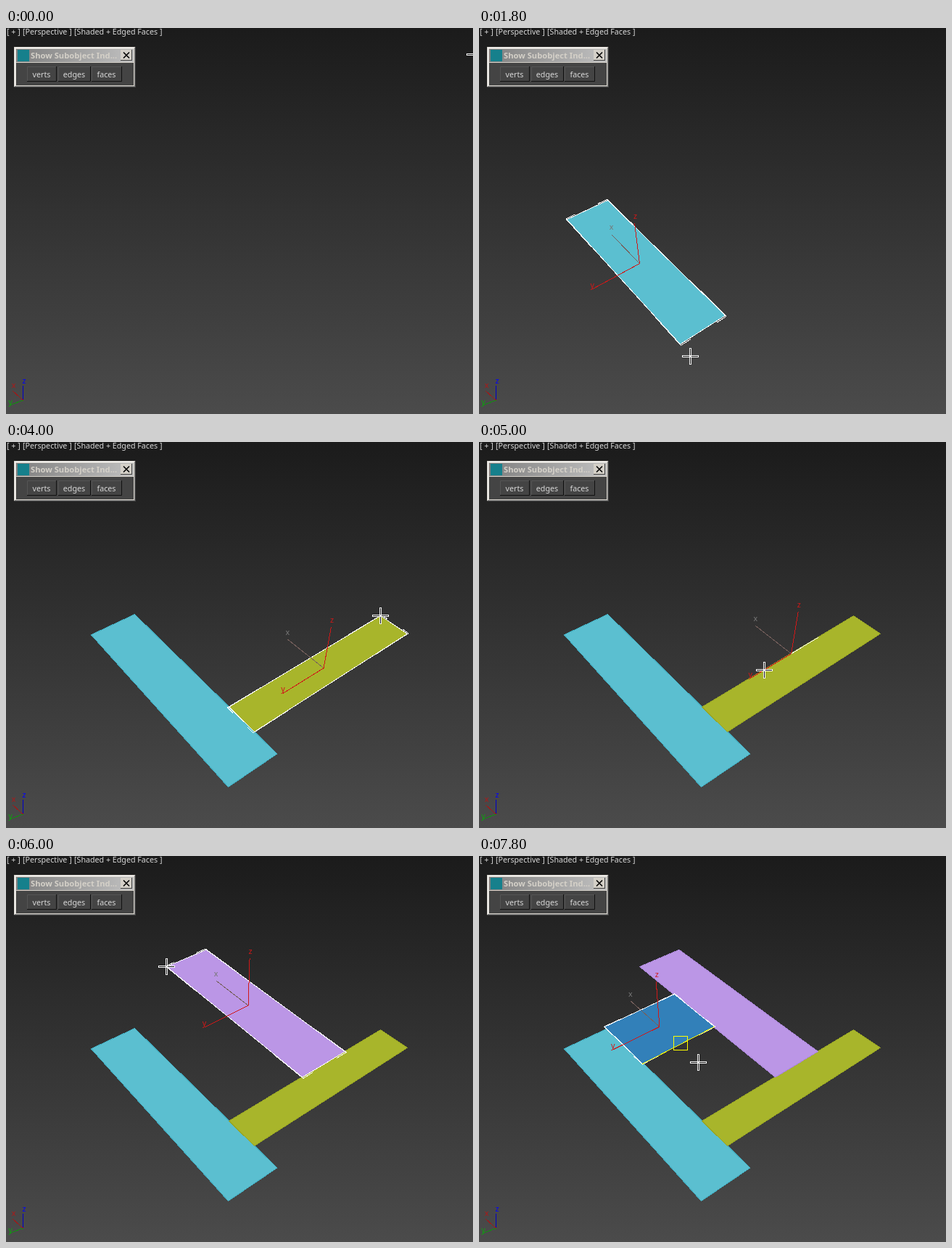
Animation of 644x532 px, one loop 8000 ms. Source, as an HTML page:

```html
<!DOCTYPE html>
<html lang="en">
<head>
<meta charset="utf-8">
<title>Building planes in a viewport</title>
<style>
  html, body { margin: 0; width: 100%; height: 100%; overflow: hidden; background: #333; }
  svg { display: block; width: 644px; height: 532px; }
  text { font: 10.7px "Noto Sans", "Open Sans", sans-serif; fill: #d8d8d8; white-space: pre; }
  .title { font-weight: bold; font-size: 11.2px; fill: #d4d0c8; }
  .mid { text-anchor: middle; }
</style>
</head>
<body>
<svg viewBox="0 0 644 532">
  <defs>
    <linearGradient id="sky" x2="0" y2="1">
      <stop stop-color="#1b1b1b"/><stop offset="1" stop-color="#4b4b4b"/>
    </linearGradient>
    <linearGradient id="bar">
      <stop stop-color="#808080"/><stop offset="1" stop-color="#c0c0c0"/>
    </linearGradient>
  </defs>
  <rect width="644" height="532" fill="url(#sky)"/>
  <text x="1" y="9">[ + ]</text>
  <text x="23" y="9">[Perspective ]</text>
  <text x="94" y="9">[Shaded + Edged Faces ]</text>

  <g shape-rendering="crispEdges">
    <rect x="11" y="26" width="168" height="56" fill="#404040"/>
    <rect x="11" y="26" width="167" height="55" fill="#d4d0c8"/>
    <rect x="12" y="27" width="166" height="54" fill="#808080"/>
    <rect x="12" y="27" width="165" height="53" fill="#fff"/>
    <rect x="13" y="28" width="164" height="52" fill="#d4d0c8"/>
    <rect x="14" y="29" width="162" height="18" fill="url(#bar)"/>
    <rect x="14" y="48" width="162" height="31" fill="#444"/>
    <rect x="16" y="30" width="16" height="16" fill="#16808c"/>
    <rect x="158" y="30" width="16" height="15" fill="#404040"/>
    <rect x="158" y="30" width="15" height="14" fill="#d4d0c8"/>
  </g>
  <path d="M162 33.5l8 8m0-8l-8 8" stroke="#000" stroke-width="1.6"/>
  <text class="title" x="34" y="42">Show Subobject Ind...</text>
  <g id="buttons"></g>
  <g id="tripod"></g>
  <g id="scene" transform="translate(.5 .5)"></g>
  <g id="cursor" shape-rendering="crispEdges"></g>
</svg>
<script>
const STEP = 200, LOOP = 8000;
const $ = id => document.getElementById(id);

// Vanishing points of the three axes
const VX = [-555, -480], VY = [1740, -497], VZ = [308, 1018];

// Each plane is dragged from corner to corner; bend bows the path, lead lets the cursor run ahead
const planes = [
  { fill: '#5bbfd0', edge: '#43adc0', start: 3, end: 10.2,
    from: [177, 237], to: [306, 475], bend: [-322, 0], lead: .07 },
  { fill: '#a8b52b', edge: '#98a524', start: 15, end: 20,
    from: [342, 399], to: [516, 239], bend: [0, 0], lead: 0 },
  { fill: '#bb96e6', edge: '#a985d6', start: 24, end: 30,
    from: [467, 269], to: [221, 152], bend: [-285, 553], lead: 0 },
  { fill: '#3280b9', edge: '#2a70a4', start: 34, end: 37,
    from: [269, 190], to: [225, 286], bend: [0, 0], lead: 0 }
];

// Plane side lit while the cursor snaps to it
const snaps = [
  { plane: 0, side: 0, part: [.14, .84], from: 13, to: 15, at: [340, 399] },
  { plane: 1, side: 1, part: [0, 1], from: 23, to: 23, at: [468, 268] },
  { plane: 3, side: 1, part: [0, 1], from: 39, to: 39, at: [278, 258] }
];

const clamp = k => Math.min(1, Math.max(0, k));
const ease = k => k * k * (3 - 2 * k);
const mix = (a, b, k) => a.map((v, i) => v + (b[i] - v) * k);

function meet(a, b, c, d) {
  const ux = b[0] - a[0], uy = b[1] - a[1], vx = d[0] - c[0], vy = d[1] - c[1];
  const k = ((c[0] - a[0]) * vy - (c[1] - a[1]) * vx) / (ux * vy - uy * vx);
  return [a[0] + ux * k, a[1] + uy * k];
}

const quad = (p, q) => [p, meet(p, VX, q, VY), q, meet(p, VY, q, VX)];

function dragged(p, s, lead = 0) {
  const k = clamp((s - p.start) / (p.end - p.start) + lead);
  const bow = k * (1 - k) ** 2;
  return mix(p.from, p.to, k).map((v, i) => v + p.bend[i] * bow);
}

function area([a, b, c, d]) {
  return Math.abs((c[0] - a[0]) * (d[1] - b[1]) - (c[1] - a[1]) * (d[0] - b[0])) / 2;
}

// Rides along with a drag, otherwise glides to the next one
function cursorAt(s) {
  let last = { step: 0, at: [646, 36] };
  for (const p of planes) {
    if (s < p.start) return glide(last, p.start, p.from, s);
    if (s <= p.end) return dragged(p, s, p.lead);
    last = { step: p.end, at: p.to };
  }
  return glide(last, 39, [302, 284], s);
}

const glide = (last, step, at, s) => mix(last.at, at, ease(clamp((s - last.step) / (step - last.step))));

const line = (a, b, color) =>
  `<path d="M${a}L${b}" stroke="${color}" fill="none" shape-rendering="crispEdges"/>`;

const label = ([x, y], t, color) =>
  `<text class="mid" x="${x}" y="${y}" style="fill:${color}">${t}</text>`;

const polygon = (q, fill, stroke) =>
  `<polygon points="${q.join(' ')}" fill="${fill}" stroke="${stroke}" shape-rendering="crispEdges"/>`;

function brackets(q, center) {
  const big = q.map(p => mix(center, p, 1.015));
  return big.map((p, i) => [1, 3].map(n =>
    line(p, mix(p, big[(i + n) % 4], .22), '#fff')).join('')).join('');
}

function gizmo(c) {
  const red = '#d01818';
  const x = mix(c, VX, .05), y = mix(c, VY, -.043), z = mix(c, VZ, -.08);
  return line(c, x, '#76605c') + line(c, y, red) + line(c, z, red) +
    label([x[0], x[1] - 6], 'x', '#777') + label([y[0], y[1] - 2], 'y', red) +
    label([z[0] + 1, z[1] - 6], 'z', red);
}

function drawScene(s) {
  const visible = planes.filter(p => s > p.start);
  let out = '', top = '';
  visible.forEach((p, i) => {
    const q = quad(p.from, dragged(p, s));
    const active = i === visible.length - 1;
    out += polygon(q, p.fill, active ? '#fff' : p.edge);
    if (!active) return;
    const flat = area(q) < 150;
    const center = flat ? mix(q[0], q[2], .5) : meet(q[0], q[2], q[1], q[3]);
    if (!flat) out += brackets(q, center);
    top = gizmo(center);
  });
  for (const n of snaps) {
    if (s < n.from || s > n.to) continue;
    const p = planes[n.plane], q = quad(p.from, p.to);
    const [a, b] = n.part.map(k => mix(q[n.side], q[n.side + 1], k));
    out += line(a, b, '#ff0');
    top += `<rect x="${n.at[0] - 10}" y="${n.at[1] - 10}" width="19" height="19" fill="none" stroke="#ff0"/>`;
  }
  $('scene').innerHTML = out + top;
  $('cursor').setAttribute('transform', `translate(${cursorAt(s).map(Math.round)})`);
}

$('buttons').innerHTML = [['verts', 29, 41], ['edges', 72, 45], ['faces', 118, 42]]
  .map(([name, x, w]) =>
    `<path d="M${x + .5} 73V53.5H${x + w - 1}" fill="none" stroke="#555"/>` +
    `<path d="M${x} 73.5H${x + w - .5}V53" fill="none" stroke="#111"/>` +
    label([x + w / 2 - .5, 68], name, '#d8d8d8')).join('');

const origin = [23.5, 513];
$('tripod').innerHTML =
  line(origin, [23.5, 493], '#0000c8') + label([25, 490], 'z', '#00f') +
  line(origin, [9, 500], '#a01818') + label([10.5, 496], 'x', '#b01818') +
  line(origin, [5, 520], '#109010') + label([6, 519], 'y', '#10a010');

$('cursor').innerHTML = '<rect width="1" height="1" fill="#fff"/>' + [0, 90, 180, 270].map(a =>
  `<g transform="rotate(${a} .5 .5)"><rect x="1" y="-1" width="11" height="3" fill="#fff"/>` +
  `<rect x="2" width="9" height="1" fill="#111"/></g>`).join('');

let shown = -1;
const began = performance.now();
function tick() {
  const s = Math.floor(((performance.now() - began) % LOOP) / STEP);
  if (s !== shown) drawScene(shown = s);
  requestAnimationFrame(tick);
}
tick();
</script>
</body>
</html>
```
